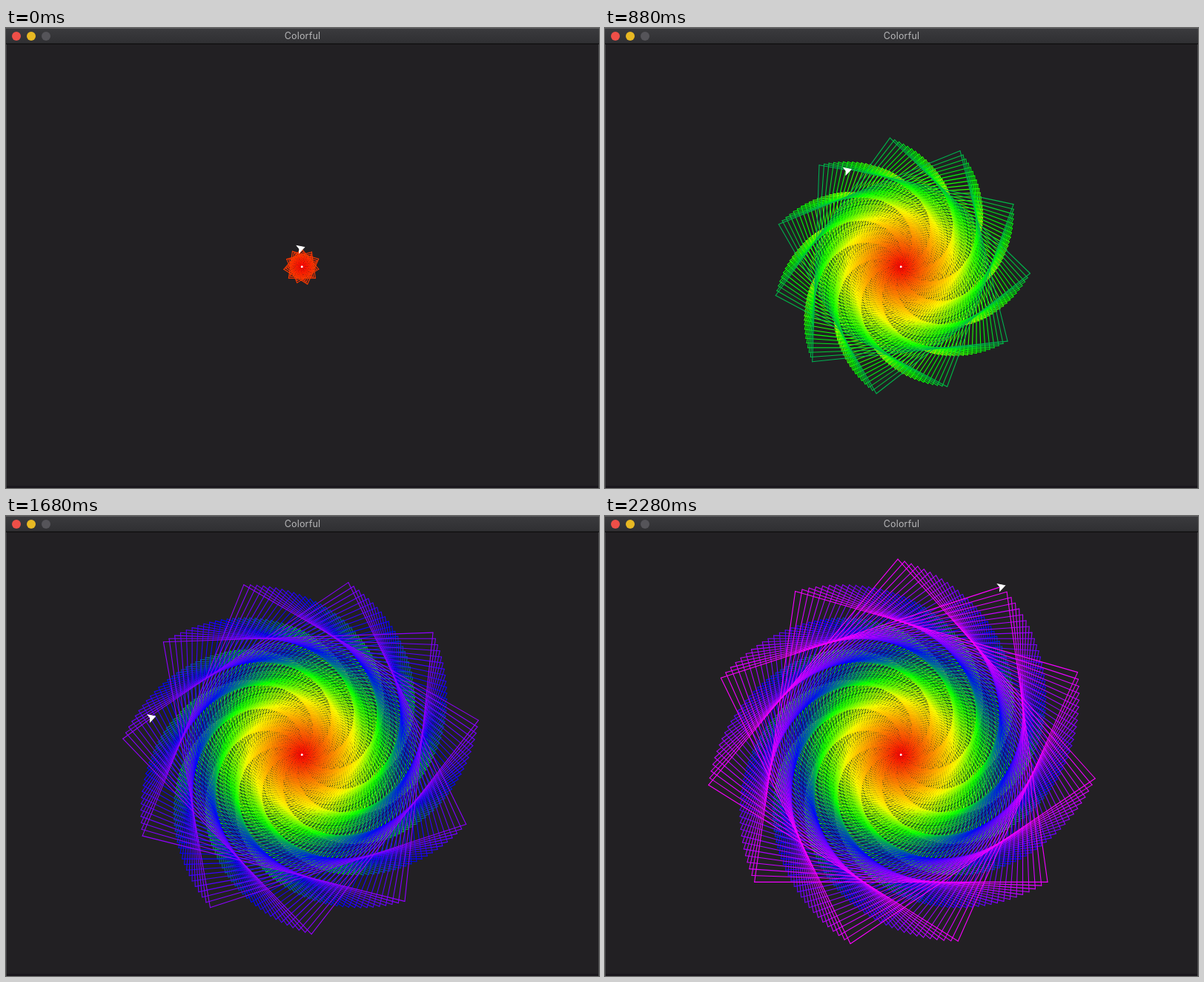
Recreate the animation shown at these times as an HTML page with a canvas. Size 800x620 px, loop 2320 ms.

```html
<!DOCTYPE html>
<html lang="en">
<head>
<meta charset="utf-8">
<title>Colorful</title>
<style>
  html, body { margin: 0; width: 100%; height: 100%; overflow: hidden; background: #222023; }
  canvas { position: absolute; left: 0; top: 0; }
  .bar {
    position: absolute; left: 0; top: 0; width: 800px; height: 21px;
    box-sizing: border-box; border-top: 1px solid #58585a; border-bottom: 1px solid #29292b;
    background: linear-gradient(#3a3a3d, #303033);
    box-shadow: 0 1px #0c0c0d;
    color: #b6b6b8; font: 12.5px/20px Inter, Roboto, sans-serif; letter-spacing: 0.2px; text-align: center;
  }
  .bar i { position: absolute; top: 4px; width: 12px; height: 12px; border-radius: 50%; }
  .edge {
    position: absolute; left: 0; top: 0; width: 800px; height: 620px; box-sizing: border-box;
    border: solid #444346; border-width: 0 1px; box-shadow: inset 0 -3px #1a171c;
  }
</style>
</head>
<body>
<canvas id="stage" width="800" height="620"></canvas>
<div class="edge"></div>
<div class="bar">
  <i style="left:8px;background:#ee4f48"></i>
  <i style="left:28px;background:#e8b923"></i>
  <i style="left:48px;background:#555459"></i>
  Colorful
</div>
<script>
const ctx = document.getElementById('stage').getContext('2d');
const LOOP = 2320, STEP = 40;
const RAD = Math.PI / 180;
const EDGES = 1000, GROWTH = 0.3994, TURN = 98 * RAD;
const START = { x: 399.7, y: 321.5 };
const ARROW_ANGLE = -18 * RAD;
const PALETTE = [[255, 0, 0], [255, 127, 0], [255, 255, 0], [0, 255, 0], [0, 0, 255], [255, 0, 255]];

// Time in ms and the number of edges drawn by then.
const PACE = [[0, 95.98], [400, 457.62], [880, 665.15], [1200, 780.63],
              [1480, 861.83], [1880, 971.18], [1993, EDGES], [LOOP, EDGES]];

const mix = (a, b, f) => a + (b - a) * f;

// Pen speed is steady, so the square of the edge count grows linearly.
function edgesAt(t) {
  const i = PACE.findIndex(p => p[0] > t);
  const [t0, n0] = PACE[i - 1], [t1, n1] = PACE[i];
  return Math.sqrt(mix(n0 * n0, n1 * n1, (t - t0) / (t1 - t0)));
}

function colorOf(edge) {
  const pos = edge / EDGES * (PALETTE.length - 1), i = Math.floor(pos);
  const rgb = PALETTE[i].map((c, j) => Math.round(mix(c, PALETTE[i + 1][j], pos - i)));
  return `rgb(${rgb})`;
}

// The arrow keeps one direction and sits around the pen.
function drawArrow(x, y) {
  ctx.save();
  ctx.translate(x, y);
  ctx.rotate(ARROW_ANGLE);
  ctx.translate(4, 0);
  ctx.beginPath();
  ctx.moveTo(0, 0);
  ctx.lineTo(-9, -5);
  ctx.lineTo(-7, 0);
  ctx.lineTo(-9, 5);
  ctx.closePath();
  ctx.fillStyle = ctx.strokeStyle = '#fff';
  ctx.lineWidth = 1;
  ctx.fill();
  ctx.stroke();
  ctx.restore();
}

function draw(t) {
  const count = edgesAt(t);
  let { x, y } = START;
  ctx.fillStyle = '#222023';
  ctx.fillRect(0, 0, 800, 620);
  ctx.lineWidth = 1.1;
  ctx.lineCap = 'round';
  for (let k = 0; k < count; k++) {
    const len = GROWTH * k * Math.min(1, count - k);
    ctx.strokeStyle = colorOf(k);
    ctx.beginPath();
    ctx.moveTo(x, y);
    x += len * Math.cos(k * TURN);
    y += len * Math.sin(k * TURN);
    ctx.lineTo(x, y);
    ctx.stroke();
  }
  ctx.fillStyle = '#fff';
  ctx.beginPath();
  ctx.arc(399.2, 321.7, 1.5, 0, 2 * Math.PI);
  ctx.fill();
  drawArrow(x, y);
}

const begin = performance.now();
let shown = -1;
function tick() {
  const t = Math.floor((performance.now() - begin) % LOOP / STEP) * STEP;
  if (t !== shown) draw(shown = t);
  requestAnimationFrame(tick);
}
tick();
</script>
</body>
</html>
```
